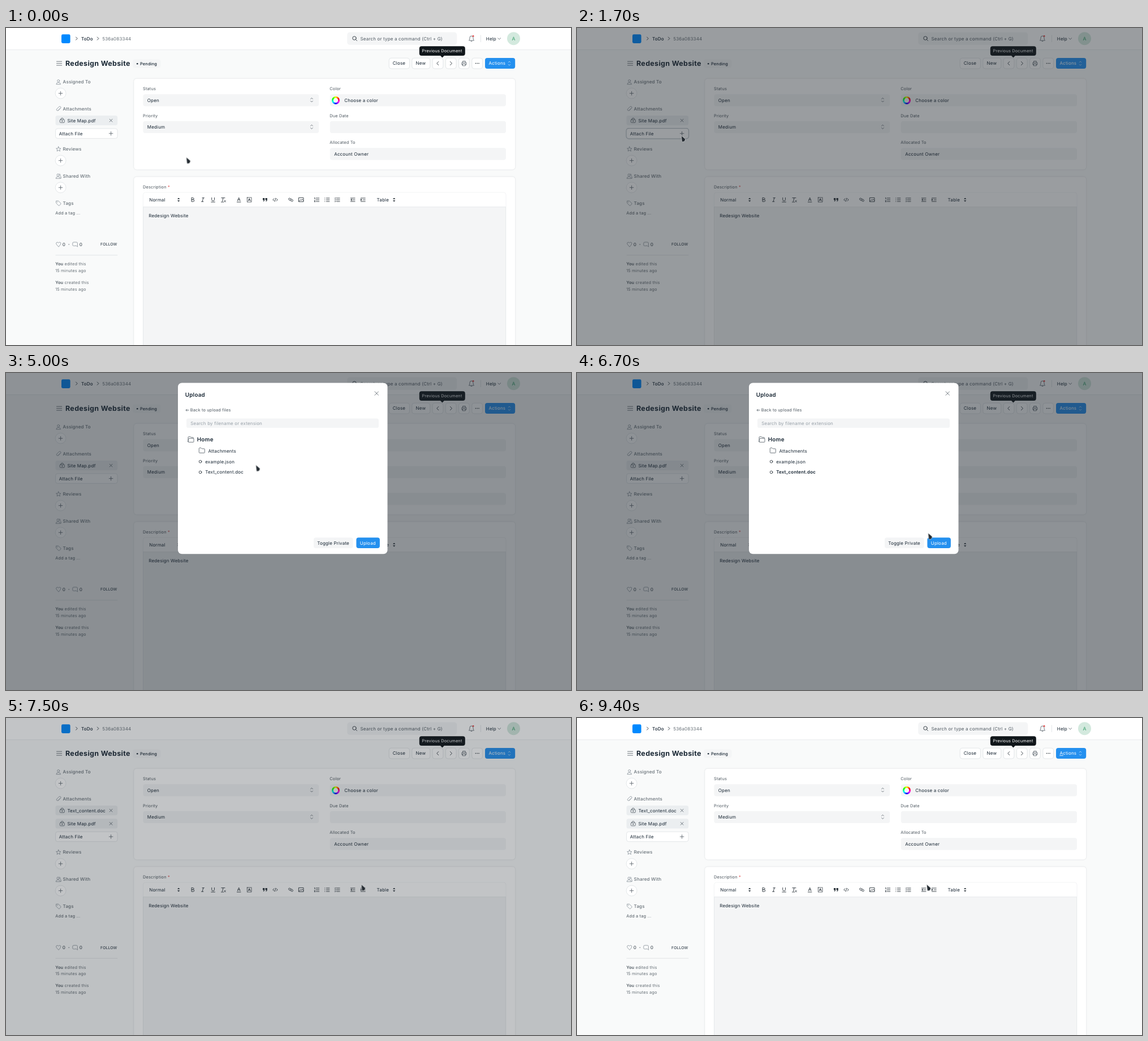
An HTML page for the animation above (10000 ms loop, 999 by 561 pixels).

```html
<!DOCTYPE html>
<html lang="en">
<head>
<meta charset="utf-8">
<title>Attach a file</title>
<style>
html, body { margin: 0; width: 100%; height: 100%; overflow: hidden; background: #f9fafa; }
svg.stage { display: block; width: 999px; height: 561px; }
text { font: 400 8.03px Inter, sans-serif; letter-spacing: .02em; fill: #192734; text-rendering: geometricPrecision; white-space: pre; }
.s { font-size: 7.41px; }
.xs { font-size: 6.8px; }
.m { font-weight: 500; }
.b { font-weight: 600; }
.big { font-size: 9.88px; font-weight: 600; }
.mid { text-anchor: middle; }
.soft { fill: #505a62; }
.mute { fill: #687178; }
.inv { fill: #fff; }
.i { fill: none; stroke: #505a62; stroke-width: .8; stroke-linecap: round; stroke-linejoin: round; }
.k { stroke: #2b343b; stroke-width: .9; }
.thin { stroke: #77828c; stroke-width: .7; }
.w { stroke: #fff; stroke-width: .7; }
.in { fill: #f4f5f6; }
.pill { fill: #ebeef0; }
.btn { fill: #fff; stroke: #d9dde0; stroke-width: .7; }
.blue { fill: #2490ef; }
.card { fill: #fff; filter: drop-shadow(0 .4px .8px rgba(25, 39, 52, .16)); }
.line { stroke: #dce0e3; stroke-width: .8; }

#ring { animation-name: ring; }
#before { animation-name: before; }
#after { animation-name: after; }
#rest { animation-name: shift; }
#key { animation-name: key; }
#shade { animation-name: shade; }
#modal { animation-name: modal; }
#pick { animation-name: pick; }
#library { animation-name: library; }
#files { animation-name: files; }
#plain { animation-name: plain; }
#chosen { animation-name: chosen; }
#cursor { animation-name: move; }
#arrow { animation-name: arrow; }
#hand { animation-name: hand; }
.stage [id] { animation-duration: 10s; animation-timing-function: step-end; animation-iteration-count: infinite; }
@keyframes ring { 0%, 22%, 100% { visibility: hidden } 15% { visibility: visible } }
@keyframes before { 0% { visibility: visible } 74%, 100% { visibility: hidden } }
@keyframes after { 0% { visibility: hidden } 74%, 100% { visibility: visible } }
@keyframes shift { 0% { transform: none } 74%, 100% { transform: translateY(23.3px) } }
@keyframes key { 0% { visibility: hidden } 94%, 100% { visibility: visible } }
@keyframes shade {
  0%, 77%, 100% { opacity: 0 } 15% { opacity: .1 } 16% { opacity: .3 } 17% { opacity: .45 }
  18% { opacity: .5 } 74% { opacity: .4 } 75% { opacity: .27 }
}
@keyframes modal {
  0%, 74%, 100% { opacity: 0; transform: translateY(-31px) }
  18% { opacity: .2; transform: translateY(-24px) }
  19% { opacity: .6; transform: translateY(-10px) }
  20% { opacity: .9; transform: translateY(-3px) }
  21%, 72% { opacity: 1; transform: none }
  73% { opacity: .5; transform: translateY(-9px) }
}
@keyframes pick { 0% { opacity: 1 } 42%, 100% { opacity: 0 } }
@keyframes library { 0% { opacity: 0 } 42%, 100% { opacity: 1 } }
@keyframes files { 0% { opacity: 0 } 43%, 100% { opacity: 1 } }
@keyframes plain { 0% { opacity: 1 } 57%, 100% { opacity: 0 } }
@keyframes chosen { 0% { opacity: 0 } 57%, 100% { opacity: 1 } }
@keyframes arrow { 0%, 43%, 100% { visibility: visible } 22% { visibility: hidden } }
@keyframes hand { 0%, 43%, 100% { visibility: hidden } 22% { visibility: visible } }
/* one percent is one 100 ms tick, so each leg moves in whole ticks */
@keyframes move {
  0%, 1% { transform: translate(318.5px, 228.5px); animation-timing-function: steps(3) }
  4% { transform: translate(296px, 224px); animation-timing-function: steps(4) }
  8% { transform: translate(211px, 200px); animation-timing-function: steps(3) }
  11%, 20% { transform: translate(184px, 190px); animation-timing-function: steps(5) }
  25%, 27% { transform: translate(343px, 187.5px); animation-timing-function: steps(3) }
  30% { transform: translate(425px, 172px); animation-timing-function: steps(4) }
  34%, 37% { transform: translate(498px, 158px); animation-timing-function: steps(2) }
  39%, 45% { transform: translate(483px, 152.5px); animation-timing-function: steps(5) }
  50% { transform: translate(441.5px, 162.5px); animation-timing-function: steps(3) }
  53%, 60% { transform: translate(405.5px, 175.5px); animation-timing-function: steps(3) }
  63% { transform: translate(460px, 205px); animation-timing-function: steps(4) }
  67% { transform: translate(620.5px, 283px); animation-timing-function: steps(2) }
  69% { transform: translate(641px, 293px); animation-timing-function: steps(1) }
  70%, 87% { transform: translate(627.8px, 294.3px); animation-timing-function: steps(4) }
  91%, 100% { transform: translate(618px, 294.3px) }
}
</style>
</head>
<body>
<svg class="stage" viewBox="0 0 999 561">
<defs>
  <path id="plus" class="i" d="M-3.3 0H3.3M0-3.3V3.3"/>
  <path id="cross" class="i" d="M-2.4-2.4L2.4 2.4M2.4-2.4L-2.4 2.4"/>
  <path id="updown" d="M-1.9-1.7L0-3.6L1.9-1.7M-1.9 1.7L0 3.6L1.9 1.7"/>
  <path id="sort" fill="#2b343b" d="M-2.2-1H2.2L0-3.5ZM-2.2 1H2.2L0 3.5Z"/>
  <path id="fold" class="i" d="M-5-3.6Q-5-4.5-4-4.5H-1.5L0-3H4Q5-3 5-2V3.5Q5 4.5 4 4.5H-4Q-5 4.5-5 3.5Z"/>
  <g id="round"><circle r="9.4" class="btn"/><use href="#plus"/></g>
  <g id="lock" class="i"><rect x="-4" y="-1.7" width="8" height="5.6" rx="1.3"/><path d="M-2-1.7V-2.5Q-2-4.3 0-4.3T2-2.5V-1.7M-1 1.1H1M0 .2V2"/></g>
  <g id="pillbox"><rect x="87.5" y="-8.7" width="109.7" height="17.4" rx="3.7" class="pill"/><use href="#lock" x="99.3"/><use href="#cross" x="185.6"/></g>
  <path id="rows" d="M-1-3H4.5M-1 0H4.5M-1 3H4.5"/>
  <g id="person"><circle cy="-2" r="2"/><path d="M-3.8 3.8Q-3.8.9 0 .9T3.8 3.8Z"/></g>
</defs>

<rect width="999" height="561" fill="#f9fafa"/>

<!-- top bar -->
<rect width="999" height="38.2" fill="#fff"/>
<path d="M0 38.5H999" stroke="#e6e9eb" stroke-width=".8"/>
<rect x="98" y="11.3" width="15.6" height="15.6" rx="2.4" fill="#0089ff"/>
<path class="i k" d="M123.6 16L126.2 18.6L123.6 21.2M161.3 16L163.9 18.6L161.3 21.2"/>
<text x="133" y="21.5" class="m">ToDo</text>
<text x="170.3" y="21.5" class="mute">536a083344</text>
<rect x="603.3" y="7.6" width="194" height="22.2" rx="4.5" class="in"/>
<g class="i k"><circle cx="616" cy="18" r="3.2"/><path d="M618.4 20.4L620.6 22.6"/></g>
<text x="626.5" y="21.7" class="soft">Search or type a command (Ctrl + G)</text>
<path class="i" d="M818.8 21.8Q820 20.6 820 18V17.2Q820 14 823 14T826 17.2V18Q826 20.6 827.2 21.8ZM821.8 23.2Q823 24.5 824.2 23.2"/>
<circle cx="826" cy="14.2" r="1.5" fill="#e24c4c"/>
<path class="line" d="M839.4 12.5V25"/>
<text x="848.8" y="21.5">Help</text>
<path class="i" d="M869.8 17.8L872.2 20.2L874.6 17.8"/>
<circle cx="897.5" cy="18.7" r="11.5" fill="#d3e9de"/>
<text x="897.6" y="21.8" class="mid" style="font-size:8.65px;fill:#38a06c">A</text>

<!-- page head -->
<path class="i" d="M89.5 59.2H98.7M89.5 62.6H98.7M89.5 66H98.7"/>
<text x="105" y="66.7" style="font-size:12.5px;font-weight:700;letter-spacing:.025em">Redesign Website</text>
<rect x="224" y="55.5" width="49.5" height="15" rx="4" fill="#f4f5f6"/>
<circle cx="232.2" cy="63.2" r="1.3" fill="#192734"/>
<text x="237" y="65.9" class="s m">Pending</text>
<rect x="677.2" y="53.2" width="36.4" height="18.8" rx="4" class="btn"/>
<text x="683.8" y="65.4">Close</text>
<rect x="717.8" y="53.2" width="32" height="18.8" rx="4" class="btn"/>
<text x="724.6" y="65.4">New</text>
<rect x="754.1" y="53.2" width="18.8" height="18.8" rx="4" class="btn"/>
<rect x="777.3" y="53.2" width="18.8" height="18.8" rx="4" class="btn"/>
<rect x="800.5" y="53.2" width="18.8" height="18.8" rx="4" class="btn"/>
<rect x="823.8" y="53.2" width="18.8" height="18.8" rx="4" class="btn"/>
<path class="i k" d="M764.8 59.5L761.7 62.6L764.8 65.7M785.4 59.5L788.5 62.6L785.4 65.7"/>
<path class="i" d="M807.6 61V58.6H812.2V61M807.6 65H806V61H813.8V65H812.2M807.6 63.5H812.2V66.8H807.6Z"/>
<g fill="#2b343b"><circle cx="830.4" cy="62.6" r=".8"/><circle cx="833.2" cy="62.6" r=".8"/><circle cx="836" cy="62.6" r=".8"/></g>
<rect x="847" y="53" width="53.2" height="19.1" rx="4" class="blue"/>
<text x="853.6" y="65.4" class="inv">Actions</text>
<rect id="key" x="853.3" y="66.2" width="6.4" height=".8" fill="#fff"/>
<use href="#updown" x="890" y="62.6" class="i w" opacity=".8"/>
<rect x="730.8" y="32.3" width="81" height="16.6" rx="4" fill="#10161a"/>
<path d="M767.8 48.7H775L771.4 52.4Z" fill="#10161a"/>
<text x="735.6" y="43.3" class="s inv">Previous Document</text>

<!-- side panel -->
<use href="#person" x="92.7" y="95.5" class="i thin"/>
<text x="100.6" y="98.4" class="m mute">Assigned To</text>
<use href="#round" x="96.6" y="115.6"/>
<path class="i thin" d="M95.8 142L92.2 145.6Q90.8 146.8 89.7 145.7T89.8 143.2L93.8 139.3Q95.3 138.2 96.5 139.3T96.5 142L92.2 146.3"/>
<text x="100.6" y="146" class="m mute">Attachments</text>
<g id="before">
  <use href="#pillbox" y="163.6"/><text x="108.4" y="166.5">Site Map.pdf</text>
</g>
<g id="after">
  <use href="#pillbox" y="163.6"/><text x="108.4" y="166.5">Text_content.doc</text>
  <use href="#pillbox" y="186.9"/><text x="108.4" y="189.8">Site Map.pdf</text>
</g>
<g id="rest">
  <rect id="ring" x="86.6" y="177.1" width="111.5" height="19.3" rx="4.6" fill="#a6b1b9"/>
  <rect x="87.6" y="178" width="109.5" height="17.4" rx="3.7" class="btn"/>
  <text x="93.7" y="189.6">Attach File</text>
  <use href="#plus" x="185.6" y="186.7"/>
  <path class="i thin" d="M92.8 210L94 212.9L97 213.1L94.7 215.1L95.5 218L92.8 216.4L90.1 218L90.9 215.1L88.6 213.1L91.6 212.9Z"/>
  <text x="100.6" y="217.2" class="m mute">Reviews</text>
  <use href="#round" x="96.6" y="234.6"/>
  <use href="#person" x="92" y="262.2" class="i thin"/>
  <path class="i thin" d="M94.6 258Q96.6 258.6 95.9 261.4Q97.5 262.4 97.4 266H96.4"/>
  <text x="100.6" y="264.9" class="m mute">Shared With</text>
  <use href="#round" x="96.6" y="282.3"/>
  <path class="i thin" d="M89 306H92.6L97 310.4Q97.4 311 97 311.5L94.2 314.2Q93.6 314.6 93 314.2L89 310.2Z"/>
  <circle cx="91" cy="308" r=".6" class="mute"/>
  <text x="100.6" y="312.6" class="m mute">Tags</text>
  <text x="87.2" y="329.8" class="s soft">Add a tag ...</text>
  <path class="i thin" d="M92.8 387L89.4 383.3Q87.9 381.2 89.3 379.7Q91.3 378.1 92.8 380.3Q94.3 378.1 96.3 379.7Q97.7 381.2 96.2 383.3Z"/>
  <text x="99.8" y="385.5" class="soft m">0</text>
  <circle cx="111.2" cy="383" r=".7" class="soft"/>
  <path class="i thin" d="M120.2 385.6H119.6Q117.8 385.6 117.8 383.8V381Q117.8 379 119.8 379H124.4Q126.4 379 126.4 381V387.2L124.6 385.6Z"/>
  <text x="129.7" y="385.5" class="soft m">0</text>
  <text x="167" y="385.4" class="xs">FOLLOW</text>
  <path class="line" d="M87.5 402H197.2"/>
  <text x="87.2" y="420.3" class="s mute"><tspan class="b soft">You</tspan> edited this</text>
  <text x="87.2" y="431.8" class="s mute">15 minutes ago</text>
  <text x="87.2" y="453.2" class="s mute"><tspan class="b soft">You</tspan> created this</text>
  <text x="87.2" y="464.8" class="s mute">15 minutes ago</text>
</g>

<!-- form -->
<rect x="226.2" y="89.7" width="674" height="160.7" rx="5" class="card"/>
<rect x="226.2" y="263.4" width="674" height="320" rx="5" class="card"/>
<text x="242" y="110.2" class="s soft">Status</text>
<rect x="242.4" y="117.2" width="310.8" height="21.2" rx="4" class="in"/>
<text x="249.8" y="130.6">Open</text>
<use href="#updown" x="540.5" y="127.4" class="i"/>
<text x="242" y="158" class="s soft">Priority</text>
<rect x="242.4" y="164.7" width="310.8" height="21.2" rx="4" class="in"/>
<text x="249.8" y="178.2">Medium</text>
<use href="#updown" x="540.5" y="175" class="i"/>
<text x="572.3" y="110.2" class="s soft">Color</text>
<rect x="572.8" y="117.2" width="311.2" height="21.2" rx="4" class="in"/>
<foreignObject x="575.8" y="120.8" width="14.4" height="14.4"><div style="width:14.4px;height:14.4px;border-radius:50%;background:conic-gradient(#ff0,#f00,#f0f,#00f,#0ff,#0f0,#ff0)"></div></foreignObject>
<circle cx="583" cy="128" r="4.2" fill="#f8f9f9"/>
<text x="598.3" y="130.8">Choose a color</text>
<text x="572.3" y="158" class="s soft">Due Date</text>
<rect x="572.8" y="164.7" width="311.2" height="21.2" rx="4" class="in"/>
<text x="572.3" y="205.2" class="s soft">Allocated To</text>
<rect x="572.8" y="212.2" width="311.2" height="21.2" rx="4" class="in"/>
<text x="580.2" y="225.7">Account Owner</text>

<text x="242" y="283.9" class="s soft">Description <tspan fill="#e24c4c">*</tspan></text>
<path d="M242.4 317V295Q242.4 291 246.4 291H880Q884 291 884 295V317" fill="none" stroke="#f0f2f3" stroke-width=".8"/>
<rect x="242.4" y="316.8" width="641.4" height="250" fill="#f4f5f6" stroke="#dfe3e6" stroke-width=".7"/>
<text x="253.2" y="306.6">Normal</text>
<use href="#sort" x="305.2" y="304"/>
<g class="i k">
  <path d="M328 300.6V307.2H331Q333 307 332.9 305.4T331 303.7H328H330.6Q332.2 303.4 332.2 302T330.6 300.6Z"/>
  <path d="M347 300.6H350.4M345.6 307.2H349M348.9 300.6L347.1 307.2"/>
  <path d="M363.7 300.3V303.7Q363.7 306 366.1 306T368.5 303.7V300.3M362.8 308H369.4"/>
  <path d="M380.8 300.6H387M384 300.6L382.5 306.5M380.5 308H384.5M385.8 305.2L388.4 307.8M388.4 305.2L385.8 307.8"/>
  <path d="M409.4 305.8L411.7 300.2L414 305.8M410.2 304H413.2M408.4 308H415"/>
  <path stroke-dasharray="1 1.2" d="M426.4 300H434V308H426.4Z"/>
  <path d="M428.2 306L430.2 301.7L432.2 306M429 304.5H431.4"/>
  <path d="M474 301.8L471.8 304L474 306.2M478 301.8L480.2 304L478 306.2M476.8 301.2L475.2 306.8"/>
  <path d="M503 302L501.6 301.2Q500 300.8 499.6 302.2T501 304.6L503 305.4Q504.4 305.6 504.8 304.4M504 306L505.4 306.8Q507 307.2 507.4 305.8T506 303.4L504 302.6Q502.6 302.4 502.2 303.6"/>
  <path d="M517.8 300.4H526V307.4H517.8ZM518 306.4L520.6 304L522 305L523.8 303L526 305.4"/>
  <path d="M545.4 300.4H546V302.8M545.2 305.4H546.5L545.2 307.6H546.6"/>
  <use href="#rows" x="549.2" y="304"/><use href="#rows" x="567.4" y="304"/><use href="#rows" x="585.6" y="304"/>
  <path d="M563.6 301H564M563.6 304H564M563.6 307H564"/>
  <path d="M581.2 301L582 301.8L583.2 300.2M581.2 304L582 304.8L583.2 303.2M581.2 307L582 307.8L583.2 306.2"/>
  <path d="M609.3 301H617M613.4 304H617M609.3 307H617M611.2 302.8L609.4 304L611.2 305.2Z"/>
  <path d="M627.4 301H635.2M631.5 304H635.2M627.4 307H635.2M627.6 302.8L629.4 304L627.6 305.2Z"/>
</g>
<path fill="#2b343b" d="M454 301H457.3V304.2Q457.1 306.5 454.9 307.2V306Q455.8 305.5 455.8 304.4H454ZM458.6 301H461.9V304.2Q461.7 306.5 459.5 307.2V306Q460.4 305.5 460.4 304.4H458.6Z"/>
<text x="655.6" y="306.6">Table</text>
<use href="#sort" x="686.2" y="304"/>
<text x="252.2" y="334.8">Redesign Website</text>

<rect id="shade" width="999" height="561" fill="#1f272e"/>

<!-- upload dialog -->
<g id="modal">
  <g id="pick">
    <rect x="304" y="17.4" width="370.5" height="254.2" rx="7" fill="#fff"/>
    <rect x="317.4" y="58.4" width="343.4" height="164.6" rx="5" fill="#f9fafa" stroke="#d3d8dc" stroke-width=".7" stroke-dasharray="2 1.4"/>
    <text x="489" y="120.6" class="mid" style="font-size:8.65px">Drag and drop files here or upload from</text>
    <circle cx="419.6" cy="143.4" r="9.9" class="blue"/>
    <circle cx="471.8" cy="143.4" r="9.9" fill="#48bb74"/>
    <circle cx="516.5" cy="143.4" r="9.9" fill="#ecac4b"/>
    <circle cx="562.3" cy="143.4" r="9.9" fill="#d12f5e"/>
    <g class="i w">
      <path d="M415 139.6H424.2V145.4H415ZM419.6 145.4V147.4M417.4 147.5H421.8"/>
      <path d="M467.4 147.4V139.6H470.4L471.4 140.8H475.4V142.4M467.4 147.4L468.4 142.4H476.4L475.6 147.4Z"/>
      <path d="M516.2 141.4L518 139.6Q519.2 138.8 520.3 139.8T520.3 142.2L518.2 144.2Q517 145 515.9 144M516.8 145.4L515 147.2Q513.8 148 512.7 147T512.7 144.6L514.8 142.6Q516 141.8 517.1 142.8"/>
      <path d="M557.8 141.2H560L560.8 139.6H563.8L564.6 141.2H566.8V147.4H557.8Z"/><circle cx="562.3" cy="144" r="1.6"/>
    </g>
    <text x="419.6" y="162.9" class="xs mid">My Device</text>
    <text x="471.8" y="162.9" class="xs mid">Library</text>
    <text x="516.5" y="162.9" class="xs mid">Link</text>
    <text x="562.3" y="162.9" class="xs mid">Camera</text>
    <rect x="544" y="242.8" width="69.6" height="18.8" rx="4" class="in"/>
    <text x="550.3" y="255.2">Toggle Private</text>
    <rect x="619.4" y="242.8" width="41.5" height="18.8" rx="4" class="blue"/>
    <text x="625.8" y="255.2" class="inv">Upload</text>
  </g>
  <g id="library">
    <rect x="304" y="17.4" width="370.5" height="302.8" rx="7" fill="#fff"/>
    <path class="i" d="M323.2 65.8H318.2M320 64L318.2 65.8L320 67.6"/>
    <text x="325.8" y="68.4" class="s soft">Back to upload files</text>
    <rect x="319" y="80.4" width="340" height="16.7" rx="3.4" class="in"/>
    <text x="326.2" y="91.7" style="fill:#98a1a9">Search by filename or extension</text>
    <path class="i" d="M322 121V114Q322 112.6 323.4 112.6H326L327.4 114H330.4Q331.6 114 331.6 115.4M322 121.4L322.8 116.6Q323 115.6 324 115.6H331Q332 115.6 332 116.6V121.4Q332 122.4 331 122.4H323Q322 122.4 322 121.4Z"/>
    <text x="337.8" y="120.7" class="big">Home</text>
    <g id="files">
      <use href="#fold" x="346.3" y="137"/>
      <text x="357.4" y="140.6">Attachments</text>
      <circle cx="343.6" cy="156.8" r="2.3" class="i k"/>
      <text x="352.2" y="159.5">example.json</text>
      <circle cx="343.6" cy="175.6" r="2.3" class="i k"/>
      <text id="plain" x="352.2" y="178.2">Text_content.doc</text>
      <text id="chosen" x="352.2" y="178.2" class="b">Text_content.doc</text>
    </g>
    <rect x="544" y="291.2" width="69.6" height="18.8" rx="4" class="in"/>
    <text x="550.3" y="303.6">Toggle Private</text>
    <rect x="619.4" y="291.2" width="41.5" height="18.8" rx="4" class="blue"/>
    <text x="625.8" y="303.6" class="inv">Upload</text>
  </g>
  <text x="316.8" y="41.7" class="big">Upload</text>
  <path class="i" d="M652 32.8L658.6 39.4M658.6 32.8L652 39.4"/>
</g>

<g id="cursor" fill="#232a30" stroke="#fff" stroke-width=".5" stroke-linejoin="round">
  <path id="arrow" d="M.3.3L7.2 6.2Q7.9 7 7.3 8L6.4 10Q6 10.8 5.2 11L2.6 11.4Q1.6 11.4 1.4 10.5Z"/>
  <path id="hand" d="M2 1Q3.2-.2 4 1.2L5 4L8 4.6Q9.2 5 9.2 6.4V9.4Q9 11.8 6.8 12H4.6Q3.2 12 2.4 10.8L.4 8.4Q-.2 7 1 6.4L2.8 6.6L1.8 2Z"/>
</g>
</svg>
</body>
</html>
```
